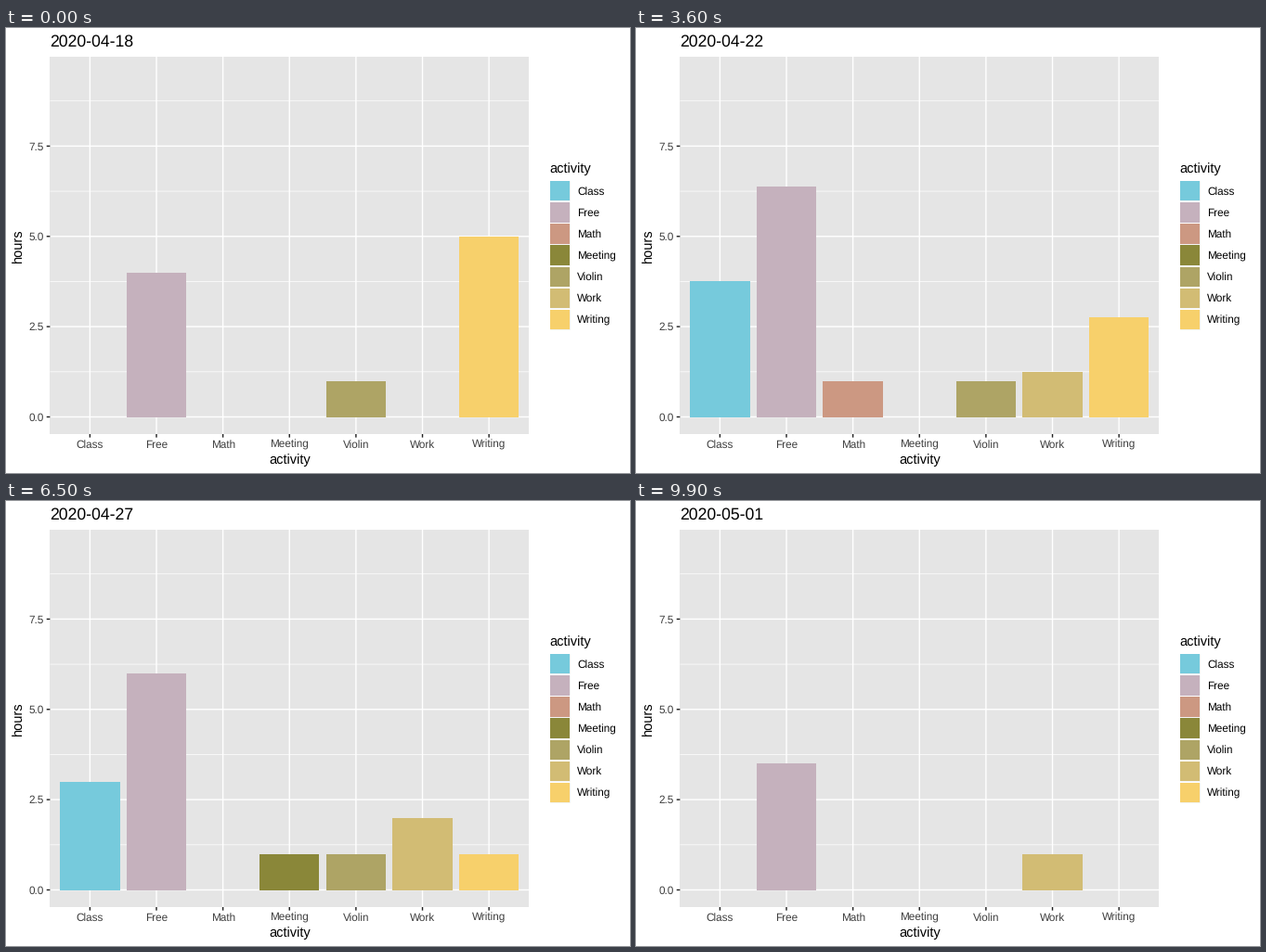
A matplotlib script for the animation above (10000 ms loop, 672 by 480 pixels).

```python
import math
import matplotlib.pyplot as plt
from matplotlib.animation import FuncAnimation
from matplotlib.patches import Rectangle

W, H, DPI = 672, 480, 96
FRAMES, STEP = 100, 100
PX = 72 / DPI

plt.rcParams["font.family"] = "Liberation Sans"
plt.rcParams["text.hinting"] = "none"

NAMES = ["Class", "Free", "Math", "Meeting", "Violin", "Work", "Writing"]
COLORS = ["#76cadc", "#c5b1bd", "#cc9882", "#8a8739",
          "#aea465", "#d2bc74", "#f7d06b"]

# hours per activity, one row per day from 18 April
DAYS = [
    [0, 4, 0, 0, 1, 0, 5],
    [0, 6, 0, 0, 1, 2, 3],
    [3, 6, 0, 1, 1, 2, 1],
    [2, 6.5, 0, 0, 1.5, 5, 0],
    [3, 6, 1, 0, 1, 2, 2],
    [4, 6.5, 1, 0, 1, 1, 3],
    [0, 7, 0.5, 3, 2, 1.5, 1],
    [0, 8, 0, 0, 1, 1, 3],
    [0, 7.5, 0, 1, 1.5, 1.5, 2],
    [3, 6, 0, 1, 1, 2, 1],
    [1.5, 9.5, 0, 0, 0, 2.5, 2],
    [3, 6, 1, 0, 1, 2, 1],
    [4, 6.5, 2, 0, 0, 0, 3],
    [0, 2, 0, 0, 0, 1, 0],
]
# frame at which each day is reached; the last entry closes the loop
ARRIVE = [0, 7, 15] + [23 + 7 * k for k in range(12)]
MOVE = 3

LEFT, RIGHT, TOP, BOTTOM = 47.4, 563.1, 31, 438
UNIT_X = (RIGHT - LEFT) / 7.2
UNIT_Y = (BOTTOM - TOP) / 10.45


def x_of(i):
    return LEFT + (i + 0.6) * UNIT_X


def y_of(hours):
    return BOTTOM - (hours + 0.475) * UNIT_Y


fig = plt.figure(figsize=(W / DPI, H / DPI), dpi=DPI, facecolor="white")
ax = fig.add_axes([0, 0, 1, 1])
ax.set_xlim(0, W)
ax.set_ylim(H, 0)
ax.axis("off")


def line(x0, y0, x1, y1, width, color="white"):
    ax.plot([x0, x1], [y0, y1], color=color, lw=width * PX,
            solid_capstyle="butt", snap=False, zorder=2)


def box(x, y, w, h, color, z, **kw):
    kw.setdefault("lw", 0)
    return ax.add_patch(Rectangle((x, y), w, h, facecolor=color, zorder=z, **kw))


def label(x, y, s, size, color="black", **kw):
    return ax.text(x, y, s, fontsize=size, color=color, zorder=5, **kw)


def draw_panel():
    box(LEFT, TOP, RIGHT - LEFT, BOTTOM - TOP, "#e5e5e5", 1)
    for k in range(4):
        y = y_of(2.5 * k + 1.25)
        line(LEFT, y, RIGHT, y, 0.71)
    for k in range(4):
        y = y_of(2.5 * k)
        line(LEFT, y, RIGHT, y, 1.42)
        line(LEFT - 3.67, y, LEFT, y, 1.42, "#222222")
        label(40.9, y + 4.2, f"{2.5 * k:.1f}", 8.8, "#3e3e3e", ha="right")
    for i, name in enumerate(NAMES):
        x = x_of(i)
        line(x, TOP, x, BOTTOM, 1.42)
        line(x, BOTTOM, x, BOTTOM + 3.67, 1.42, "#222222")
        label(x, 453, name, 8.8, "#3e3e3e", ha="center")
    label((LEFT + RIGHT) / 2, 470, "activity", 11, ha="center")
    label(18, (TOP + BOTTOM) / 2, "hours", 11, rotation=90,
          rotation_mode="anchor", ha="center")


def draw_legend():
    key = 23.04
    label(585, 156, "activity", 11)
    for i, (name, color) in enumerate(zip(NAMES, COLORS)):
        y = 164.4 + i * key
        box(585, y, key, key, "#efefef", 2, edgecolor="white", lw=1.42 * PX)
        box(585.95, y + 0.95, key - 1.9, key - 1.9, color, 3)
        label(615.2, y + key / 2 + 4.2, name, 8.8)


draw_panel()
draw_legend()
bars = [box(x_of(i) - 0.45 * UNIT_X, y_of(0), 0.9 * UNIT_X, 0, c, 4)
        for i, c in enumerate(COLORS)]
title = label(47, 20, "", 13.2)


def date_of(day):
    return f"2020-04-{18 + day}" if day < 13 else "2020-05-01"


def update(frame):
    day = max(k for k in range(len(DAYS)) if ARRIVE[k] <= frame)
    now, nxt = DAYS[day], DAYS[(day + 1) % len(DAYS)]
    t = max(0, frame - (ARRIVE[day + 1] - MOVE)) / MOVE
    ease = (1 - math.cos(math.pi * t)) / 2
    for bar, a, b in zip(bars, now, nxt):
        # bars present on only one day switch at arrival
        hours = a + (b - a) * ease if a and b else a
        bar.set_height(-hours * UNIT_Y)
        bar.set_visible(hours > 0)
    title.set_text(date_of(day))
    return bars + [title]


anim = FuncAnimation(fig, update, frames=FRAMES, interval=STEP,
                     repeat=True, repeat_delay=0, blit=False)
plt.show()
```
